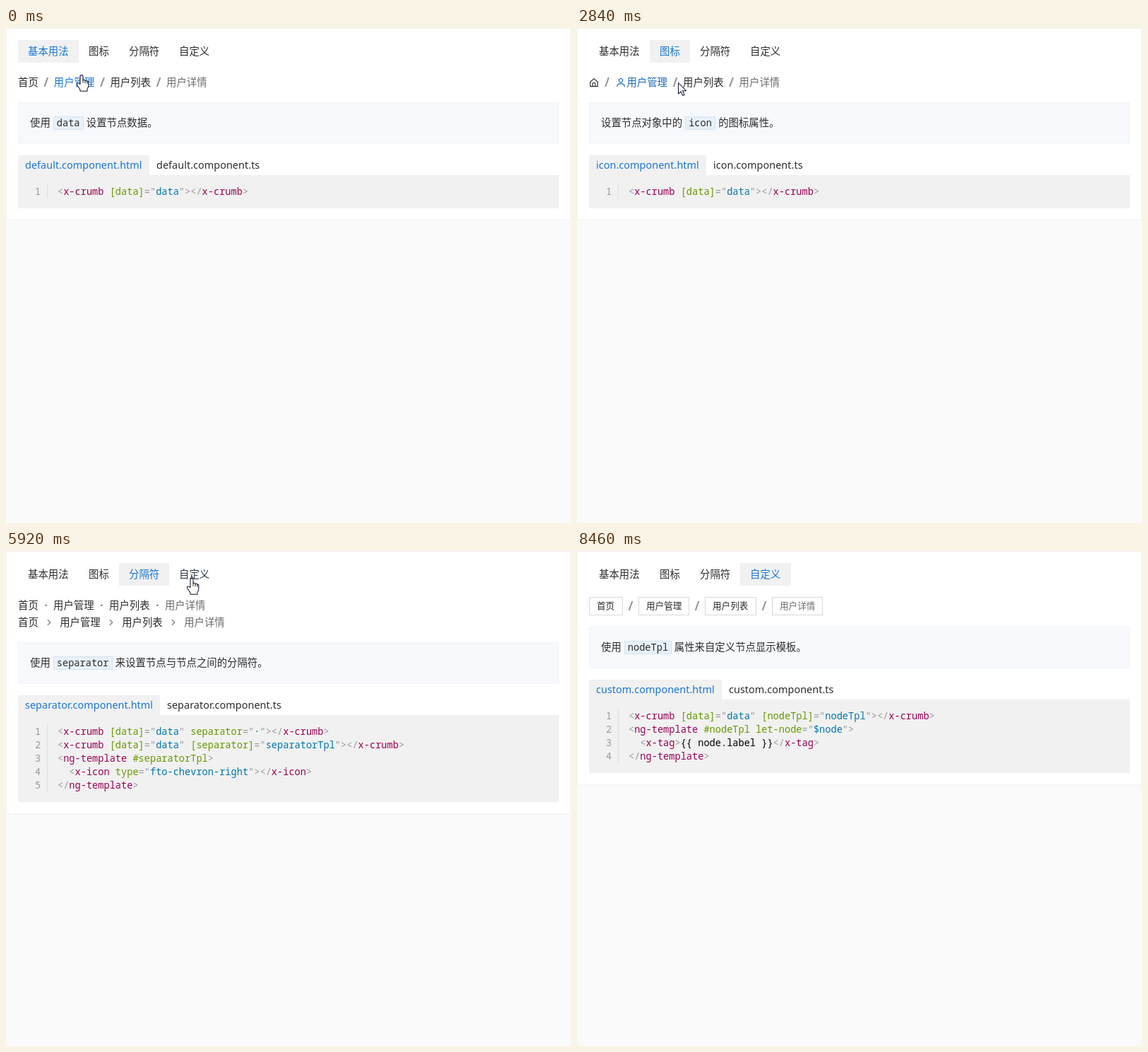
Write an HTML page with a canvas that moves like this. It is 800 px wide and 700 px high and loops after 8.92 s.

```html
<!DOCTYPE html>
<html lang="zh-CN">
<head>
<meta charset="utf-8">
<title>Breadcrumb demo</title>
<style>
html, body { margin: 0; width: 100%; height: 100%; overflow: hidden; background: #fafafa; }
canvas { display: block; width: 800px; height: 700px; }
</style>
</head>
<body>
<canvas id="stage"></canvas>
<script>
const LOOP = 8920;
const SANS = '"Noto Sans", "Noto Sans CJK SC", "Noto Sans CJK", sans-serif';
const BODY = '14.4px ' + SANS;
const SLASH = 'bold 17px ' + SANS;
const DOT = 'bold 14.4px ' + SANS;
const SMALL = '12.6px ' + SANS;
const MONO = '13.65px "Noto Sans Mono", "DejaVu Sans Mono", monospace';
const DARK = [44, 44, 44], GREY = [108, 108, 108], BLUE = [25, 118, 210];
const INK = '#2c2c2c', LINK = '#1976d2', PUNCT = '#999', TAG = '#905', ATTR = '#690', VALUE = '#07a';
const EM = 14.4;

const canvas = document.getElementById('stage');
const ctx = canvas.getContext('2d');
const ratio = window.devicePixelRatio || 1;
canvas.width = 800 * ratio;
canvas.height = 700 * ratio;

const labels = ['首页', '用户管理', '用户列表', '用户详情'];
const tabs = [
  { label: '基本用法', x: 17, w: 86 },
  { label: '图标', x: 103, w: 57 },
  { label: '分隔符', x: 160, w: 71 },
  { label: '自定义', x: 231, w: 72 }
].map(tab => ({ ...tab, y: 17, h: 32, link: true }));

// Lays out one breadcrumb line with the given gap between nodes.
function crumbs(cy, sep, gap, icons = []) {
  let x = 17;
  return labels.map((name, i) => {
    const icon = icons[i];
    const label = icon === 'home' ? '' : name;
    const w = (icon === 'home' ? EM : icon ? 17 : 0) + label.length * EM;
    const item = { x, y: cy - 11, w, h: 22, cy, label, icon, link: i < 3, sep: i < 3 && sep, gap };
    x += w + gap;
    return item;
  });
}

const boxes = [[17, 48], [87, 72], [181, 73], [276, 72]].map(([x, w], i) => ({
  x, w, y: 65, h: 26, cy: 77.5, label: labels[i], box: true, link: i < 3, sep: i < 3 && '/', gap: 22
}));

const views = [
  {
    from: 0, top: 105, file: 'default', text: ['使用', 'data', '设置节点数据。'],
    items: crumbs(77, '/', 22),
    code: ['<x-crumb [data]="data"></x-crumb>']
  },
  {
    from: 1890, top: 105, file: 'icon', text: ['设置节点对象中的', 'icon', '的图标属性。'],
    items: crumbs(77, '/', 22, ['home', 'user']),
    code: ['<x-crumb [data]="data"></x-crumb>']
  },
  {
    from: 3695, top: 129, file: 'separator', text: ['使用', 'separator', '来设置节点与节点之间的分隔符。'],
    items: [...crumbs(77, '·', 21.3), ...crumbs(101, '>', 30.4)],
    code: [
      '<x-crumb [data]="data" separator="·"></x-crumb>',
      '<x-crumb [data]="data" [separator]="separatorTpl"></x-crumb>',
      '<ng-template #separatorTpl>',
      '  <x-icon type="fto-chevron-right"></x-icon>',
      '</ng-template>'
    ]
  },
  {
    from: 6505, top: 107, file: 'custom', text: ['使用', 'nodeTpl', '属性来自定义节点显示模板。'],
    items: boxes,
    code: [
      '<x-crumb [data]="data" [nodeTpl]="nodeTpl"></x-crumb>',
      '<ng-template #nodeTpl let-node="$node">',
      '  <x-tag>{{ node.label }}</x-tag>',
      '</ng-template>'
    ]
  }
];

// Pointer route: time, x, y
const route = [
  [0, 107, 66], [60, 107, 66], [240, 139, 49], [470, 139, 49], [640, 69, 81], [920, 69, 81],
  [1650, 136, 41], [1900, 136, 41], [2650, 100, 80], [2730, 100, 80], [2800, 127, 78], [2840, 143, 77],
  [3100, 185, 72], [3470, 195, 38], [4000, 195, 38], [4480, 184, 67], [4850, 100, 80],
  [5100, 105, 102], [5420, 190, 103], [5640, 190, 103], [5920, 263, 38], [6150, 264, 36],
  [6520, 264, 36], [7310, 218, 83], [7540, 218, 83], [7900, 320, 200], [8240, 579, 529],
  [8390, 727, 690], [8460, 800, 770]
];
const presses = [[1830, 1890], [3620, 3695], [6430, 6505], [7400, 7540]];

function pointer(t) {
  const i = route.findIndex(p => p[0] > t);
  if (i < 0) return { x: 800, y: 770 };
  if (!i) return { x: route[0][1], y: route[0][2] };
  const [t0, x0, y0] = route[i - 1], [t1, x1, y1] = route[i];
  const u = (t - t0) / (t1 - t0);
  return { x: Math.round(x0 + (x1 - x0) * u), y: Math.round(y0 + (y1 - y0) * u) };
}

const hit = (r, p) => r.link && p.x >= r.x && p.x < r.x + r.w && p.y >= r.y && p.y < r.y + r.h;

// Eased share of the last 200 ms spent over the item, which gives the colour fade.
function hover(item, t) {
  let n = 0;
  for (let k = 0; k < 8; k++) n += hit(item, pointer(Math.max(0, t - k * 25)));
  const u = n / 8;
  return u * u * (3 - 2 * u);
}

const mix = (a, b, u) => `rgb(${a.map((v, i) => Math.round(v + (b[i] - v) * u)).join()})`;

function rect(x, y, w, h, fill, border) {
  if (border) {
    ctx.fillStyle = border;
    ctx.fillRect(x, y, w, h);
    x++; y++; w -= 2; h -= 2;
  }
  ctx.fillStyle = fill;
  ctx.fillRect(x, y, w, h);
}

function text(str, x, y, color, font = BODY) {
  ctx.font = font;
  ctx.fillStyle = color;
  ctx.fillText(str, x, y);
  return ctx.measureText(str).width;
}

function stroke(path, x, y, color, width) {
  ctx.save();
  ctx.translate(x, y);
  ctx.strokeStyle = color;
  ctx.lineWidth = width;
  ctx.lineJoin = ctx.lineCap = 'round';
  ctx.stroke(path);
  ctx.restore();
}

const icons = {
  home: new Path2D('M1.8 6.2L7 1.6L12.2 6.2V12.6H1.8ZM5.2 12.4V8.8Q5.2 7.4 7 7.4Q8.8 7.4 8.8 8.8V12.4'),
  user: new Path2D('M11.3 4.2A2.7 2.7 0 1 1 5.9 4.2A2.7 2.7 0 1 1 11.3 4.2M3.4 12.6Q3.6 8.6 8.6 8.6Q13.6 8.6 13.8 12.6')
};
const chevron = new Path2D('M-1.8 -3.6L1.8 0L-1.8 3.6');
const arrow = new Path2D('M.5 .5V16.2L4.1 12.8L6.6 18.4L9 17.4L6.6 11.8H11.6Z');
const hand = new Path2D('M-2 13.5V2.3Q-2 .6 0 .6Q2 .6 2 2.3V8Q2 7 3.5 7Q5 7 5 9Q5 8 6.5 8Q8 8 8 10' +
  'Q8 9 9 9.2Q9.8 9.5 9.8 11V16Q9.8 18 8 20V23.2H-2V21Q-4 18 -6.5 14.5Q-7 12.6 -5.5 12Q-4 11.8 -2 13.5Z');
const fingers = new Path2D('M2 8V11.5M5 9V12M8 10V12.5');

function drawTabs(t, active, held) {
  tabs.forEach((tab, i) => {
    const d = held(tab);
    if (i === active) rect(tab.x, tab.y, tab.w, tab.h, '#f1f1f1');
    const color = mix(DARK, BLUE, i === active ? 1 : hover(tab, t));
    text(tab.label, tab.x + 14 + d, 38.4 + d, color);
  });
}

function drawItem(item, t, held) {
  const d = held(item);
  const color = mix(item.link ? DARK : GREY, BLUE, hover(item, t));
  const { x, cy, w, gap } = item;
  if (item.box) {
    rect(x + d, item.y + d, w, item.h, '#fff', '#d9d9d9');
    text(item.label, x + 11 + d, cy + 4.5 + d, color, SMALL);
  } else {
    if (item.icon) stroke(icons[item.icon], x + d, cy - 7 + d, color, 1.2);
    text(item.label, x + (item.icon ? 17 : 0) + d, cy + 5.4 + d, color);
  }
  const mid = x + w + gap / 2;
  if (item.sep === '>') stroke(chevron, mid, cy, '#777', 1.2);
  else if (item.sep) {
    const slash = item.sep === '/';
    ctx.textAlign = 'center';
    text(item.sep, mid, cy + (slash ? 6.4 : 5.4), slash ? '#999' : '#777', slash ? SLASH : DOT);
    ctx.textAlign = 'left';
  }
}

function drawNote(view) {
  const { top, text: [before, name, after] } = view;
  const base = top + 34.4;
  rect(17, top, 766, 59, '#f7f9fc', '#f2f5f8');
  let x = 34 + text(before, 34, base, INK) + 4;
  ctx.font = MONO;
  const w = Math.round(ctx.measureText(name).width + 10);
  rect(Math.round(x), top + 20, w, 19, '#e8f1f9', '#d3e4f5');
  text(name, x + 5, base - .4, INK, MONO);
  text(after, x + w + 4, base, INK);
}

// Splits one line of markup into coloured pieces.
function tokens(line) {
  const out = [];
  for (const part of line.split(/(<[^>]*>)/)) {
    if (part[0] !== '<') {
      out.push([part, '#000']);
      continue;
    }
    for (const s of part.match(/<\/?|[\w-]+(?=[\s>])|"[^"]*"|[>=]|\s+|[^\s=>"]+/g)) {
      const prev = out.length ? out[out.length - 1][0] : '';
      if (s[0] === '"') out.push(['"', PUNCT], [s.slice(1, -1), VALUE], ['"', PUNCT]);
      else if (/^[<>=]/.test(s)) out.push([s, PUNCT]);
      else out.push([s, prev[0] === '<' ? TAG : ATTR]);
    }
  }
  return out;
}

function drawCode(view) {
  const y = view.top + 75, n = view.code.length;
  const first = view.file + '.component.html';
  ctx.font = BODY;
  ctx.letterSpacing = '0.05px';
  const w = Math.round(ctx.measureText(first).width + 20);
  rect(17, y, w, 28, '#f1f1f1');
  text(first, 27, y + 19, LINK);
  text(view.file + '.component.ts', 17 + w + 10, y + 19, INK);
  ctx.letterSpacing = '0px';
  rect(17, y + 28, 766, n * 19 + 28, '#f1f1f1');
  rect(58, y + 42, 1, n * 19, '#ddd');
  view.code.forEach((line, i) => {
    const base = y + 56 + i * 19;
    text(String(i + 1), 41, base, '#999', MONO);
    let x = 73;
    for (const [s, color] of tokens(line)) x += text(s, x, base, color, MONO);
  });
}

function drawPointer(p, over) {
  ctx.save();
  ctx.translate(p.x, p.y);
  ctx.fillStyle = '#fff';
  ctx.fill(over ? hand : arrow);
  ctx.restore();
  stroke(over ? hand : arrow, p.x, p.y, '#10142a', 1.05);
  if (over) stroke(fingers, p.x, p.y, '#10142a', .9);
}

function draw(t) {
  let active = views.length - 1;
  while (views[active].from > t) active--;
  const view = views[active];
  const p = pointer(t);
  const down = presses.some(([a, b]) => t >= a && t < b);
  const held = item => (down && hit(item, p) ? 1 : 0);

  ctx.setTransform(ratio, 0, 0, ratio, 0, 0);
  rect(0, 0, 800, 700, '#fafafa');
  rect(0, 0, 800, view.top + 148 + view.code.length * 19, '#fff', '#f3f3f5');
  drawTabs(t, active, held);
  view.items.forEach(item => drawItem(item, t, held));
  drawNote(view);
  drawCode(view);
  if (t < 8455) drawPointer(p, [...tabs, ...view.items].some(item => hit(item, p)));
}

const start = performance.now();
function frame() {
  draw((performance.now() - start) % LOOP);
  requestAnimationFrame(frame);
}
frame();
</script>
</body>
</html>
```
